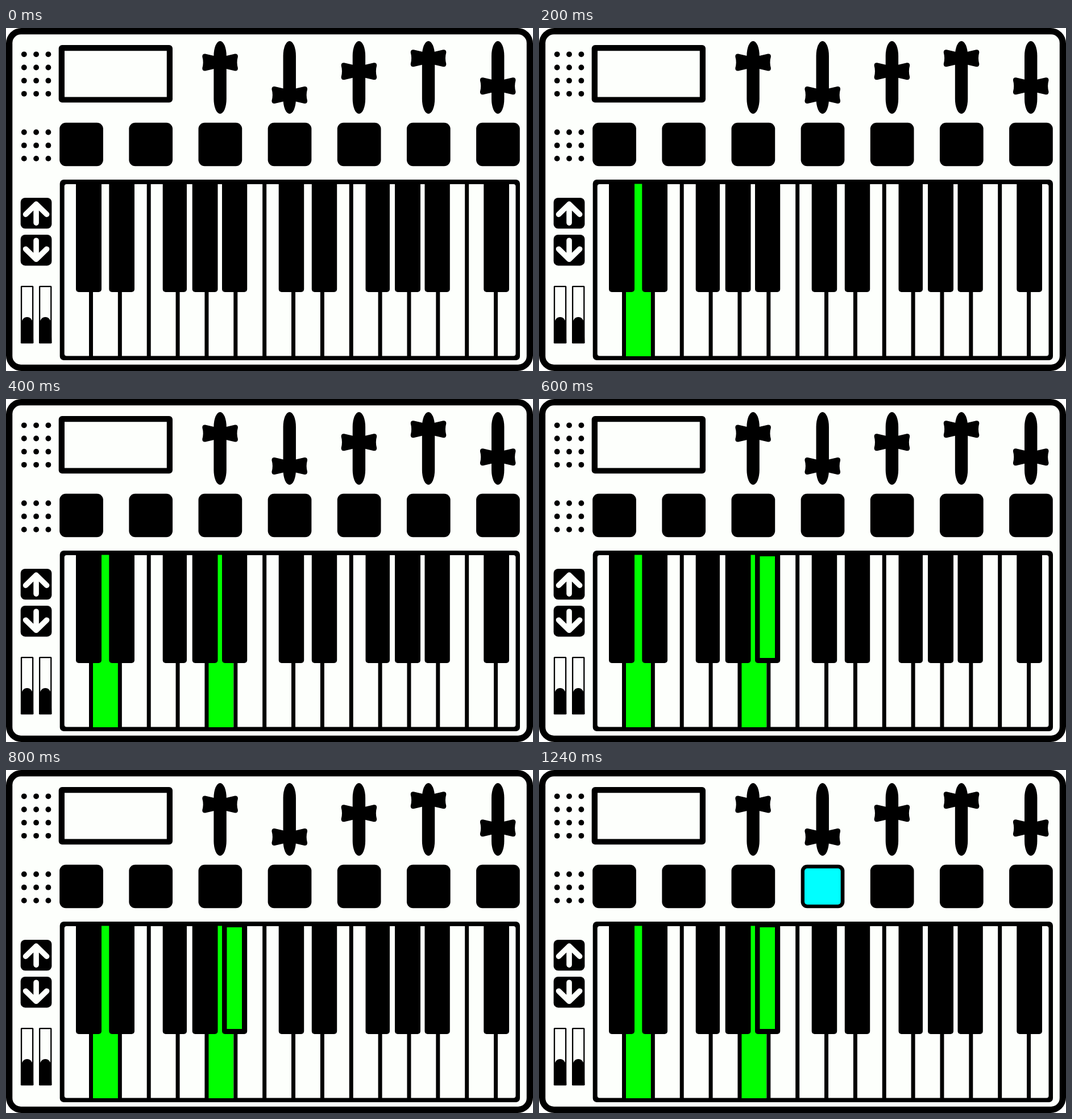
These frames come from a looping animation (927 by 604 pixels, 1400 ms). An HTML page with a canvas:

```html
<!DOCTYPE html>
<html lang="en">
<head>
<meta charset="utf-8">
<title>MIDI keyboard</title>
<style>
html, body { margin: 0; width: 100%; height: 100%; overflow: hidden; background: #fff; }
canvas { display: block; }
</style>
</head>
<body>
<canvas id="stage" width="927" height="604"></canvas>
<script>
const ctx = document.getElementById('stage').getContext('2d');
const INK = '#000', PAPER = '#fdfffc', GREEN = '#00ff00', CYAN = '#00ffff';
const LOOP = 1400;
const BLACK_KEYS = [
  [123, 168], [181.3, 226], [275.7, 318], [327.7, 372.5], [380, 424.2], [479.7, 524.2],
  [537.8, 582.2], [632.5, 675], [684, 729], [736.5, 780.8], [840.3, 885]
];
const SLIDERS = [60.5, 118, 76.2, 53.3, 102.3];

// Filled box given by its edges
function box(x0, y0, x1, y1, r, color) {
  ctx.fillStyle = color;
  ctx.beginPath();
  ctx.roundRect(x0, y0, x1 - x0, y1 - y0, r);
  ctx.fill();
}

function dots(rows) {
  ctx.fillStyle = INK;
  for (const y of rows) for (const x of [31.8, 53.1, 74.4]) {
    ctx.beginPath();
    ctx.arc(x, y, 4.9, 0, Math.PI * 2);
    ctx.fill();
  }
}

function slider(x, y) {
  ctx.fillStyle = INK;
  ctx.beginPath();
  ctx.ellipse(x, 49, 11.2, 26, 0, Math.PI, 0);
  ctx.ellipse(x, 125, 11.2, 26, 0, 0, Math.PI);
  ctx.fill();
  for (const side of [-1, 1]) {
    ctx.save();
    ctx.translate(x, y);
    ctx.scale(side, 1);
    ctx.beginPath();
    ctx.moveTo(-1, -11.5);
    ctx.lineTo(11, -11.5);
    ctx.lineTo(26, -15);
    ctx.quadraticCurveTo(31.5, -15.5, 31.3, -10);
    ctx.quadraticCurveTo(28.5, 0, 31.3, 10);
    ctx.quadraticCurveTo(31.5, 15.5, 26, 15);
    ctx.lineTo(11, 11.5);
    ctx.lineTo(-1, 11.5);
    ctx.fill();
    ctx.restore();
  }
}

function arrow(y, dir) {
  box(25.7, y - 27.2, 80.4, y + 27.2, 8, INK);
  ctx.save();
  ctx.translate(53.1, y);
  ctx.scale(1, dir);
  ctx.strokeStyle = PAPER;
  ctx.lineWidth = 9.6;
  ctx.lineCap = ctx.lineJoin = 'round';
  ctx.beginPath();
  ctx.moveTo(0, 17);
  ctx.lineTo(0, -14);
  ctx.moveTo(-18.5, 2);
  ctx.lineTo(0, -16);
  ctx.lineTo(18.5, 2);
  ctx.stroke();
  ctx.restore();
}

function wheel(x) {
  box(x, 454, x + 22.4, 555.5, 1.5, INK);
  box(x + 2.3, 456.3, x + 20.1, 530, 0, PAPER);
  ctx.fillStyle = INK;
  ctx.beginPath();
  ctx.ellipse(x + 11.2, 520, 10, 11, 0, Math.PI, 0);
  ctx.lineTo(x + 22.4, 555);
  ctx.lineTo(x, 555);
  ctx.fill();
}

function piano(t) {
  box(94.7, 267, 904, 585, 7, INK);
  box(102.7, 275, 896.5, 577.5, 4, PAPER);
  if (t >= 200) box(153, 274.5, 197, 578, 0, GREEN);
  if (t >= 400) box(356, 274.5, 400, 578, 0, GREEN);
  for (let i = 0; i < 15; i++) {
    const x = 149.5 + i * 50.86;
    // Keys without a black key between them are split along their full height
    const top = [2, 6, 9, 13].includes(i) ? 270 : 460;
    box(x - 3.5, top, x + 3.5, 580, 0, INK);
  }
  // Neck of the pressed key runs up between its black neighbours
  for (const [x0, x1] of BLACK_KEYS) box(x0, 270, x1, 465, [0, 0, 5, 5], INK);
  if (t >= 600) box(388.5, 277, 415, 456, 0, GREEN);
}

function draw(t) {
  ctx.clearRect(0, 0, 927, 604);
  box(0, 0, 927, 604, 27, INK);
  box(11.3, 11.3, 915.8, 592.7, 15, PAPER);
  dots([46.3, 69.5, 92.7, 115.8]);
  dots([183.5, 206.7, 229.9]);
  box(92.7, 30, 293, 131.3, 6, INK);
  box(103, 40.3, 282.8, 121.5, 0, PAPER);
  SLIDERS.forEach((y, i) => slider(376.6 + i * 122.15, y));
  for (let i = 0; i < 7; i++) {
    const x = 94.2 + i * 122.15;
    box(x, 166.8, x + 76.7, 243.3, 11, INK);
  }
  if (t >= 1000) box(467, 173.3, 530.7, 237, 5, CYAN);
  arrow(326.1, 1);
  arrow(391.2, -1);
  wheel(25.9);
  wheel(58);
  piano(t);
}

const start = performance.now();
function tick() {
  draw((performance.now() - start) % LOOP);
  requestAnimationFrame(tick);
}
tick();
</script>
</body>
</html>
```
